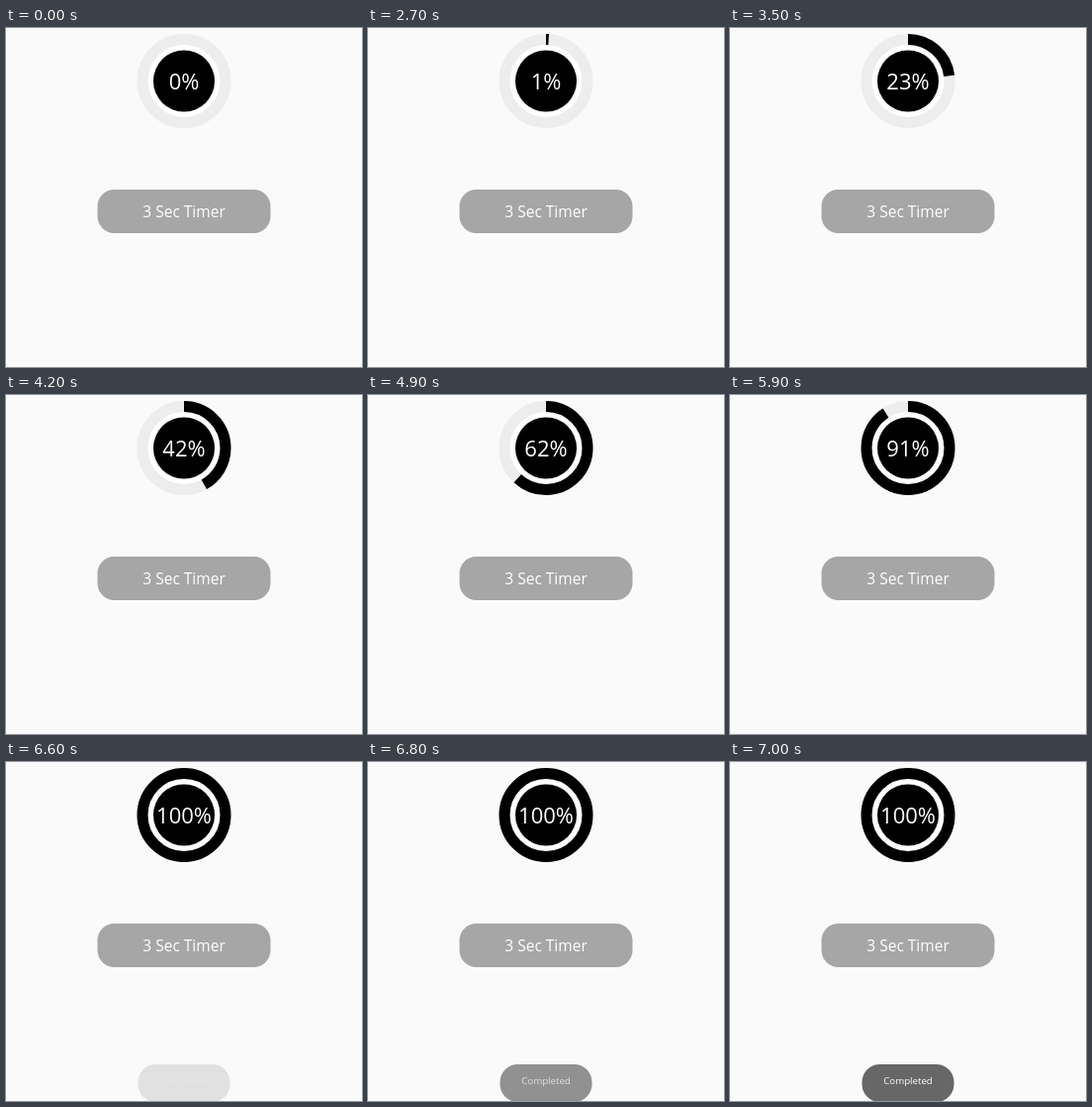
These frames come from a looping animation (360x342 px, 8100 ms). An HTML page with a canvas:

```html
<!DOCTYPE html>
<html lang="en">
<head>
<meta charset="utf-8">
<title>Timer</title>
<style>
  html, body { margin: 0; width: 100%; height: 100%; overflow: hidden; background: #fafafa; }
  canvas { display: block; width: 360px; height: 342px; }
</style>
</head>
<body>
<canvas id="stage" width="360" height="342"></canvas>
<script>
const ctx = document.getElementById('stage').getContext('2d');
const LOOP = 8100, TICK = 100;
const CENTER = { x: 180, y: 53.5 };
// [time in ms, percent]
const PROGRESS = [[2700, 1], [4200, 42], [4900, 62], [5900, 91], [6200, 99], [6300, 100]];
const TOAST = { start: 6450, fade: 550 };

function percentAt(t) {
  if (t < PROGRESS[0][0]) return 0;
  for (let i = 1; i < PROGRESS.length; i++) {
    const [t0, p0] = PROGRESS[i - 1], [t1, p1] = PROGRESS[i];
    if (t < t1) return Math.round(p0 + (p1 - p0) * (t - t0) / (t1 - t0));
  }
  return 100;
}

function toastAlpha(t) {
  const x = Math.min(1, Math.max(0, (t - TOAST.start) / TOAST.fade));
  return (1 - Math.cos(Math.PI * x)) / 2;
}

function disc(radius, color) {
  ctx.fillStyle = color;
  ctx.beginPath();
  ctx.arc(CENTER.x, CENTER.y, radius, 0, Math.PI * 2);
  ctx.fill();
}

function ring(fraction, color) {
  ctx.strokeStyle = color;
  ctx.lineWidth = 11;
  ctx.beginPath();
  ctx.arc(CENTER.x, CENTER.y, 42, -Math.PI / 2, Math.PI * (2 * fraction - 0.5));
  ctx.stroke();
}

function pill(x, y, w, h, radius, color) {
  ctx.fillStyle = color;
  ctx.beginPath();
  ctx.roundRect(x, y, w, h, radius);
  ctx.fill();
}

function label(text, baseline, size) {
  ctx.font = `${size}px "Open Sans", "Noto Sans", sans-serif`;
  ctx.textAlign = 'center';
  ctx.fillStyle = '#fff';
  ctx.fillText(text, 180, baseline);
}

function draw(t) {
  ctx.fillStyle = '#fafafa';
  ctx.fillRect(0, 0, 360, 342);

  const percent = percentAt(t);
  disc(37, '#fff');
  ring(1, '#ededed');
  if (percent) ring(percent / 100, '#000');
  disc(31, '#000');
  label(percent + '%', 62, 22);

  pill(92.5, 163, 175, 44, 17, '#a6a6a6');
  label('3 Sec Timer', 191, 15.5);

  const alpha = toastAlpha(t);
  if (alpha) {
    ctx.globalAlpha = alpha;
    pill(133.5, 305, 93, 38, 18, '#676767');
    label('Completed', 325, 9.7);
    ctx.globalAlpha = 1;
  }
}

const start = performance.now();
function frame() {
  const t = (performance.now() - start) % LOOP;
  draw(Math.floor(t / TICK) * TICK);
  requestAnimationFrame(frame);
}
frame();
</script>
</body>
</html>
```
